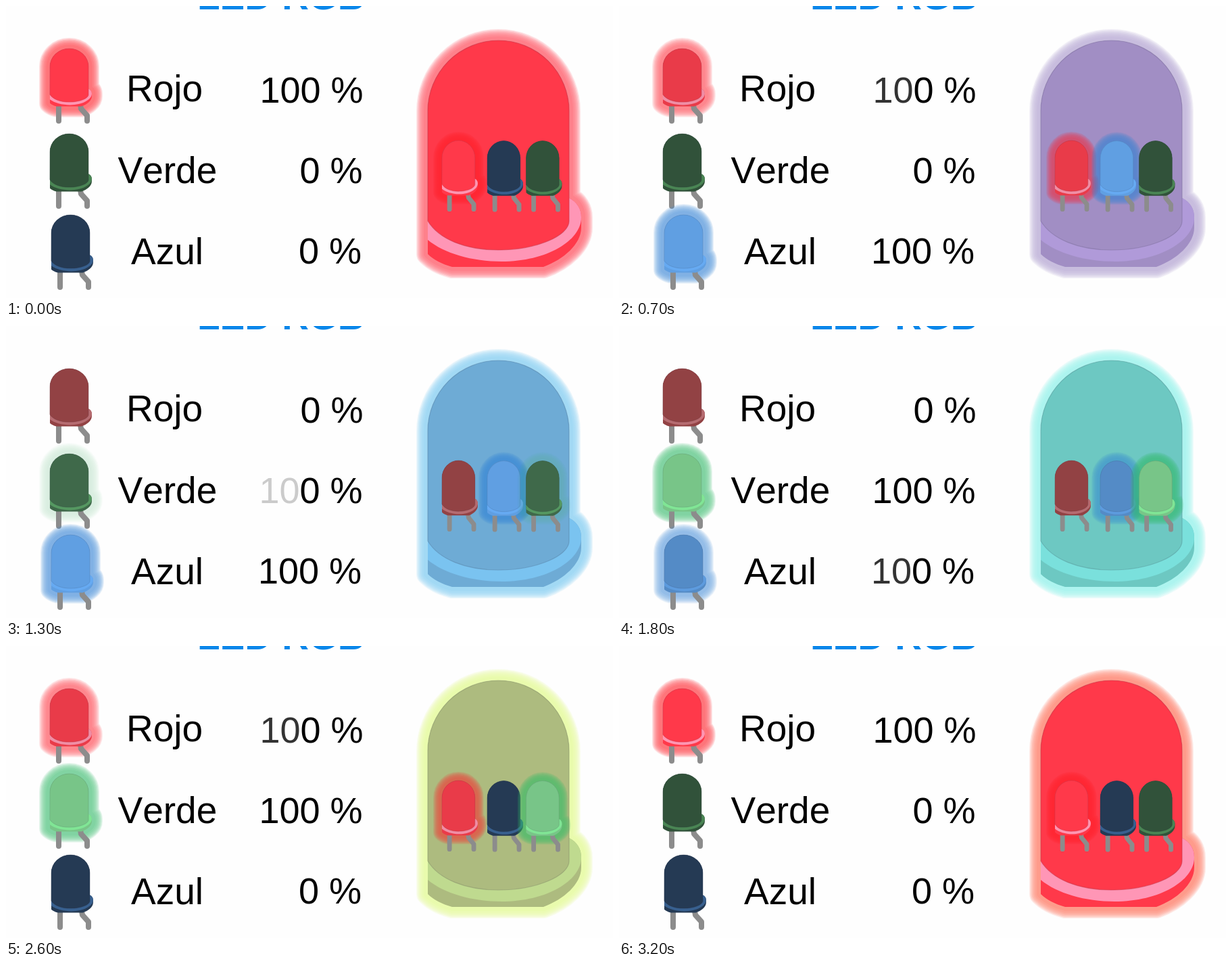
These frames come from a looping animation (898 px wide and 432 px high, 3300 ms). An HTML page with a canvas:

```html
<!DOCTYPE html>
<html lang="es">
<head>
<meta charset="utf-8">
<title>LED RGB</title>
<style>
html, body { margin: 0; width: 100%; height: 100%; overflow: hidden; background: #fefefe; }
canvas { display: block; }
</style>
</head>
<body>
<canvas id="stage" width="898" height="432"></canvas>
<script>
const ctx = document.getElementById("stage").getContext("2d");
const FONT = '"Liberation Sans", Arial, sans-serif';

// LED parts, drawn at the size of the large LED
const OUTLINE = "M624 367V155.5A104.5 104.5 0 0 1 833 155.5V284C845 290 851 300 851 313V328" +
  "C851 352 825 375 795 386H660C645 382 632 375 624 367Z";
const RIM = "M624 318L833 284C845 290 851 300 851 313C851 347 800 378 733 378C690 378 648 366 624 346Z";
const BODY = "M624 155.5A104.5 104.5 0 0 1 833 155.5V318C833 340 785 361 728 361C680 361 640 345 624 318Z";

// Each stage: lit channels (r, g, b) and the colours of the large LED
const STAGES = [
  { on: [1, 0, 0], body: [255, 57, 74], rim: [255, 150, 182], glow: [255, 50, 62] },
  { on: [1, 0, 1], body: [174, 136, 191], rim: [189, 146, 211], glow: [181, 136, 196] },
  { on: [0, 0, 1], body: [111, 164, 215], rim: [124, 188, 242], glow: [100, 172, 230] },
  { on: [0, 1, 1], body: [105, 200, 204], rim: [116, 221, 230], glow: [127, 240, 242] },
  { on: [0, 1, 0], body: [124, 199, 152], rim: [144, 237, 182], glow: [105, 216, 179] },
  { on: [1, 1, 0], body: [185, 184, 121], rim: [203, 213, 133], glow: [241, 250, 100] }
];

const CHANNELS = [
  { label: "Rojo", labelX: 178, labelY: 141, valueX: 528.5, valueY: 143, led: [65, 63], inner: [645, 199],
    body: [[146, 66, 68], [255, 57, 74]], rim: [[182, 108, 113], [255, 150, 178]], glow: [255, 30, 40] },
  { label: "Verde", labelX: 165.5, labelY: 262, valueX: 527.5, valueY: 262, led: [65, 189], inner: [769.5, 199.5],
    body: [[49, 82, 58], [120, 197, 136]], rim: [[74, 133, 84], [128, 229, 149]], glow: [48, 180, 98] },
  { label: "Azul", labelX: 185, labelY: 382, valueX: 526, valueY: 381, led: [67, 309], inner: [712, 199.5],
    body: [[37, 58, 84], [96, 159, 226]], rim: [[56, 96, 143], [102, 170, 242]], glow: [48, 128, 204] }
];

const lerp = (a, b, p) => a + (b - a) * p;
const mix = (a, b, p) => a.map((v, i) => lerp(v, b[i], p));
const rgb = (c, alpha = 1) => `rgba(${c.map(Math.round)},${alpha})`;

function makeLed(x, y, sx, sy) {
  const matrix = new DOMMatrix([sx, 0, 0, sy, x - 624 * sx, y - 51 * sy]);
  const [outline, rim, body] = [OUTLINE, RIM, BODY].map(d => {
    const path = new Path2D();
    path.addPath(new Path2D(d), matrix);
    return path;
  });
  return { outline, rim, body };
}

function makeSmallLed(x, y, sx, sy) {
  const led = makeLed(x, y, sx * 57 / 209, sy * 85.5 / 335);
  led.legs = new Path2D();
  led.legs.addPath(new Path2D("M13 83V107M45 83L46 89L55 99V107"), new DOMMatrix([sx, 0, 0, sy, x, y]));
  led.legWidth = 8 * sx;
  return led;
}

const bigLed = makeLed(624, 51, 1, 1);
for (const c of CHANNELS) {
  c.outerLed = makeSmallLed(...c.led, 1, 1);
  c.innerLed = makeSmallLed(...c.inner, 0.855, 0.95);
}

// Bands crowd towards the rim, so the halo is flat inside and falls off at its edge
function drawGlow(led, color, radius, strength) {
  if (!strength) return;
  const bands = 8;
  ctx.lineJoin = "round";
  ctx.strokeStyle = rgb(color, 0.11 * strength);
  for (let i = 1; i <= bands; i++) {
    ctx.lineWidth = 2 * radius * Math.sqrt(i / bands);
    ctx.stroke(led.outline);
  }
}

function drawLed(led, body, rim, lineWidth) {
  if (led.legs) {
    ctx.strokeStyle = "#8c8c8c";
    ctx.lineWidth = led.legWidth;
    ctx.lineCap = ctx.lineJoin = "round";
    ctx.stroke(led.legs);
  }
  ctx.fillStyle = rgb(body);
  ctx.fill(led.outline);
  ctx.fillStyle = rgb(rim);
  ctx.fill(led.rim);
  ctx.fillStyle = rgb(body);
  ctx.fill(led.body);
  ctx.strokeStyle = rgb(mix(body, [40, 40, 60], 0.3), 0.5);
  ctx.lineWidth = lineWidth;
  ctx.stroke(led.body);
}

function drawChannelLed(led, c, level, radius) {
  drawGlow(led, c.glow, radius, level);
  drawLed(led, mix(...c.body, level), mix(...c.rim, level), 0.8);
}

function drawText(text, x, y, align, color) {
  ctx.textAlign = align;
  ctx.fillStyle = color;
  ctx.fillText(text, x, y);
}

// Five steps per fade; the first and the eighth pose are held twice as long
function poseAt(time) {
  const slot = Math.floor(time / 100);
  const step = slot - (slot >= 1) - (slot >= 9);
  if (!step) return { stage: 0, p: 0 };
  return { stage: Math.floor((step - 1) / 5), p: ((step - 1) % 5 + 1) / 5 };
}

function render(time) {
  const { stage, p } = poseAt(time);
  const from = STAGES[stage], to = STAGES[(stage + 1) % STAGES.length];
  const levels = mix(from.on, to.on, p);

  ctx.fillStyle = "#fefefe";
  ctx.fillRect(0, 0, 898, 432);
  ctx.fontKerning = "none";
  ctx.font = `bold 55px ${FONT}`;
  drawText("LED RGB", 283, 4.5, "left", "#0987ea");

  CHANNELS.forEach((c, i) => {
    drawChannelLed(c.outerLed, c, levels[i], 16);
    ctx.font = `55px ${FONT}`;
    drawText(c.label, c.labelX, c.labelY, "left", "#000");
    ctx.font = `54px ${FONT}`;
    drawText("0 %", c.valueX, c.valueY, "right", "#000");
    const tailWidth = ctx.measureText("0 %").width;
    drawText("10", c.valueX - tailWidth, c.valueY, "right", `rgba(0,0,0,${levels[i]})`);
  });

  // The large halo trails slightly behind its body
  drawGlow(bigLed, mix(from.glow, to.glow, Math.min(p, 0.8)), 17, 1);
  drawLed(bigLed, mix(from.body, to.body, p), mix(from.rim, to.rim, p), 1.2);
  for (const i of [0, 2, 1]) drawChannelLed(CHANNELS[i].innerLed, CHANNELS[i], levels[i], 13);
}

const start = performance.now();
function frame() {
  render((performance.now() - start) % 3300);
  requestAnimationFrame(frame);
}
frame();
</script>
</body>
</html>
```
